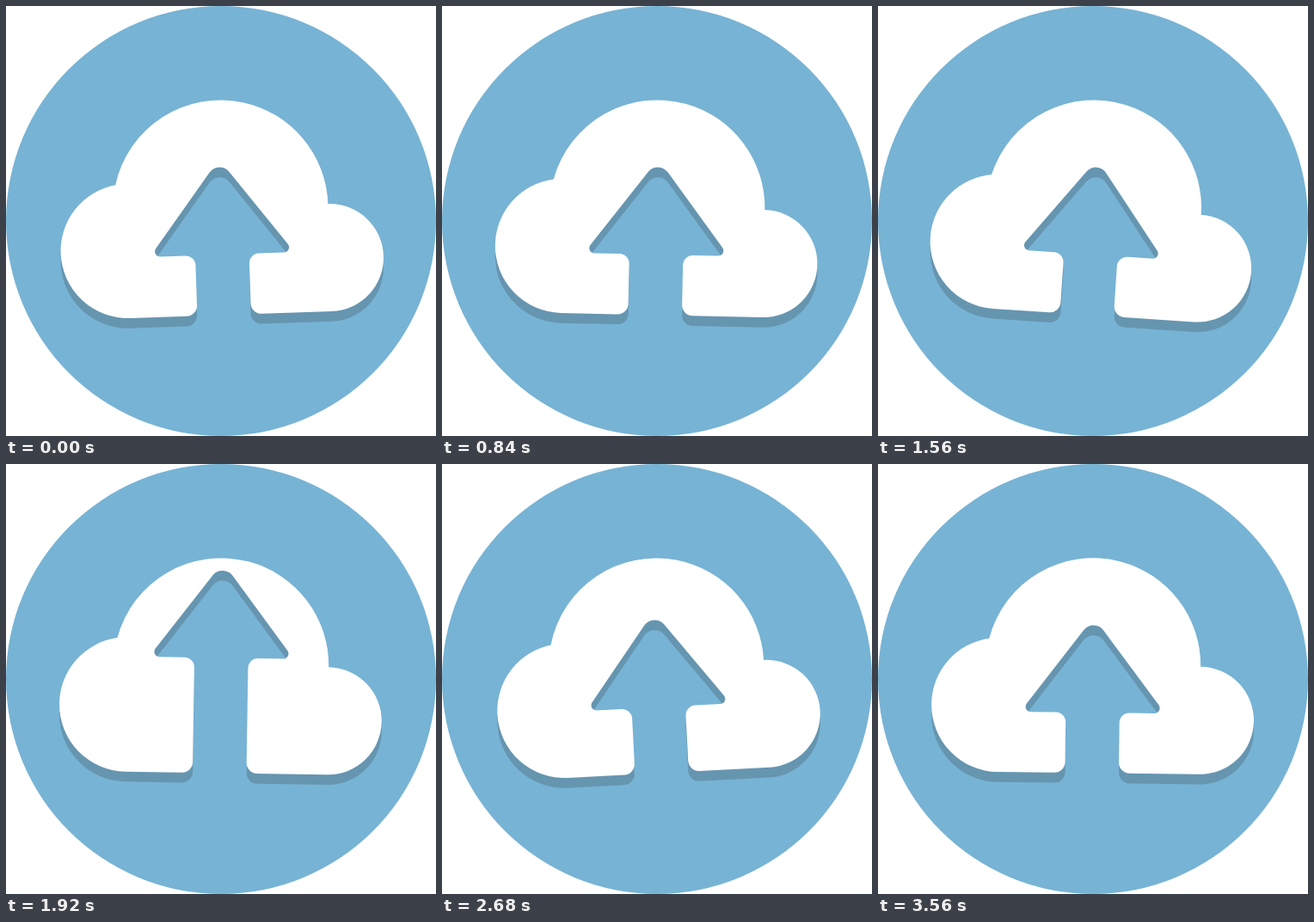
Write an HTML page with a canvas that moves like this. It is 500 px wide and 500 px high and loops after 3600 ms.

```html
<!DOCTYPE html>
<html lang="en">
<head>
<meta charset="utf-8">
<title>Cloud upload</title>
<style>
  html, body { margin: 0; width: 100%; height: 100%; overflow: hidden; background: #fff; }
  canvas { display: block; width: 100vmin; height: 100vmin; }
</style>
</head>
<body>
<canvas id="stage" width="500" height="500"></canvas>
<script>
const ctx = document.getElementById('stage').getContext('2d');
const LOOP = 3600, STEP = 40;
const UNIT = 500 / 64;
const BOTTOM = 46 * UNIT;
const SHADOW_DROP = 1.5 * UNIT;

// Cloud lobes: centre and radius
const lobe = (x, y, r) => ({ x: x * UNIT, y: y * UNIT, r: r * UNIT });
const left = lobe(18, 36, 10), dome = lobe(32, 30, 16), right = lobe(48, 38, 8);

// Cloud tilt: [time in ms, degrees], eased between the turning points
const swing = [[-20, -1.95], [910, 1.3], [1630, 3.85], [2390, -5.4], [3200, 3.1], [3940, -2]];

// Arrow hops: [start, duration, height]
const hops = [[0, 510, 43], [510, 335, 18], [1616, 507, 70.3], [2123, 507, 68.8], [2630, 507, 66.5]];

const ease = x => (1 - Math.cos(Math.PI * x)) / 2;

function tiltAt(t) {
  const i = swing.findIndex(([time]) => time > t);
  const [t0, a0] = swing[i - 1], [t1, a1] = swing[i];
  return a0 + (a1 - a0) * ease((t - t0) / (t1 - t0));
}

function liftAt(t) {
  const hop = hops.find(([start, span]) => t >= start && t < start + span);
  return hop ? hop[2] * ease(2 * (t - hop[0]) / hop[1]) : 0;
}

// Angle on lobe a at which it meets lobe b; side picks the crossing
function meet(a, b, side) {
  const dx = b.x - a.x, dy = b.y - a.y, d = Math.hypot(dx, dy);
  return Math.atan2(dy, dx) + side * Math.acos((d * d + a.r * a.r - b.r * b.r) / (2 * d * a.r));
}

function addLobe(path, c, from, to) {
  path.arc(c.x, c.y, c.r, from, to);
}

function cloudPath(lift) {
  const path = new Path2D();
  addLobe(path, left, Math.PI / 2, meet(left, dome, -1));
  addLobe(path, dome, meet(dome, left, 1), meet(dome, right, -1));
  addLobe(path, right, meet(right, dome, 1), Math.PI / 2);

  // Arrow notch: x, y, corner radius
  const shoulder = 37 * UNIT - lift, stem = 4 * UNIT, head = 84.1;
  const notch = [
    [250 + stem, BOTTOM, 12.5],
    [250 + stem, shoulder, 11.5],
    [250 + head, shoulder, 6],
    [250, 178 - lift, 14.5],
    [250 - head, shoulder, 6],
    [250 - stem, shoulder, 11.5],
    [250 - stem, BOTTOM, 12.5],
    [left.x, BOTTOM, 0]
  ];
  for (let i = 0; i < notch.length - 1; i++) {
    const [x, y, r] = notch[i], [nx, ny] = notch[i + 1];
    path.arcTo(x, y, nx, ny, r);
  }
  path.closePath();
  return path;
}

function drawCloud(path, tilt, drop, color) {
  ctx.save();
  ctx.translate(250, 250 + drop);
  ctx.rotate(tilt * Math.PI / 180);
  ctx.translate(-250, -250);
  ctx.fillStyle = color;
  ctx.fill(path);
  ctx.restore();
}

function draw(t) {
  ctx.clearRect(0, 0, 500, 500);
  ctx.fillStyle = '#77b3d4';
  ctx.beginPath();
  ctx.arc(250, 250, 250, 0, 2 * Math.PI);
  ctx.fill();

  const path = cloudPath(liftAt(t)), tilt = tiltAt(t);
  drawCloud(path, tilt, SHADOW_DROP, 'rgba(35, 31, 32, 0.2)');
  drawCloud(path, tilt, 0, '#fff');
}

const begin = performance.now();
function tick() {
  const t = (performance.now() - begin) % LOOP;
  draw(Math.floor(t / STEP) * STEP);
  requestAnimationFrame(tick);
}
tick();
</script>
</body>
</html>
```
